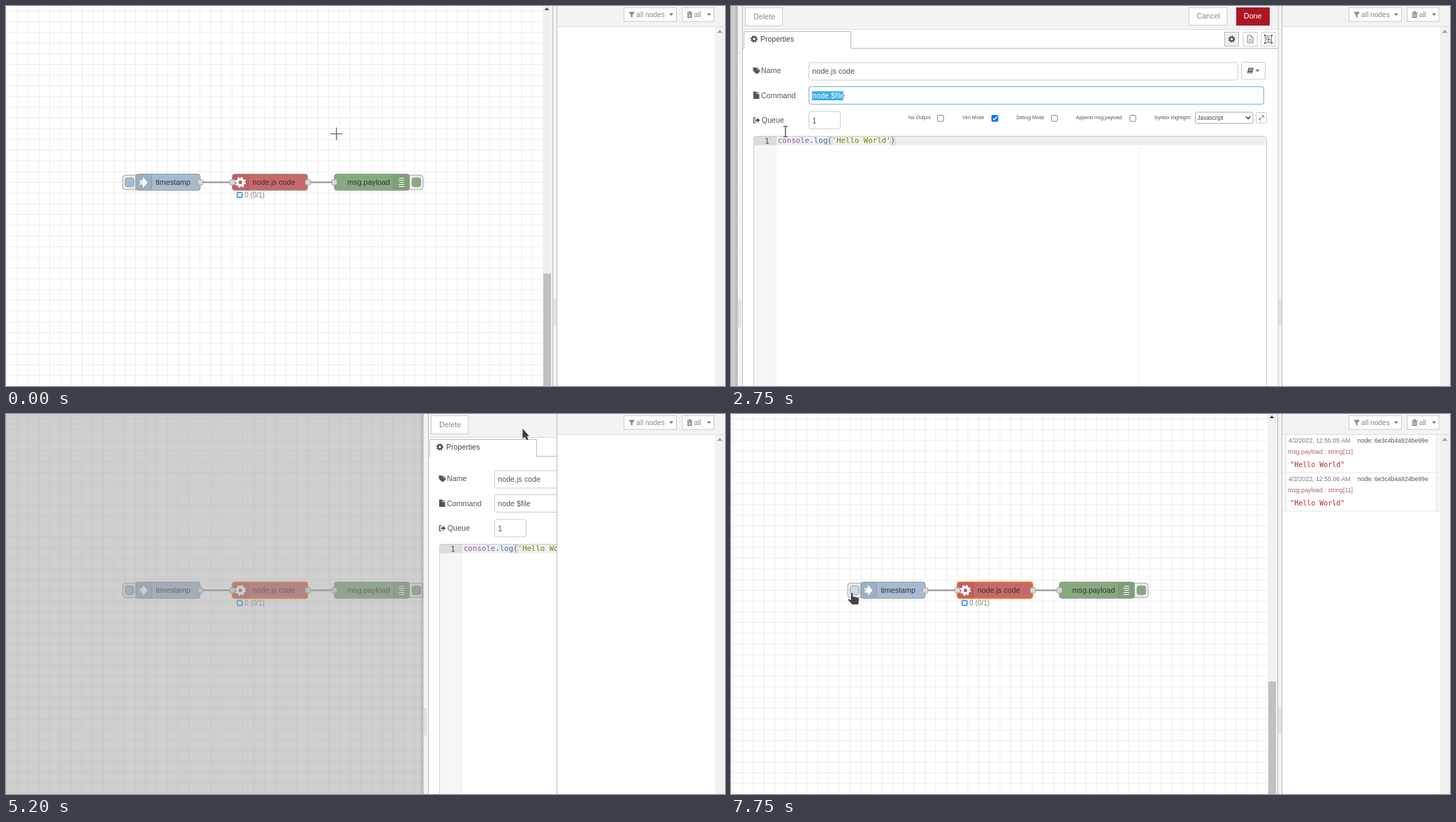
Animation, 1029 px wide and 544 px high, one loop 8 s. Source, as an HTML page:

```html
<!DOCTYPE html>
<html lang="en">
<head>
<meta charset="utf-8">
<title>Flow editor</title>
<style>
  html, body { margin: 0; width: 100%; height: 100%; overflow: hidden; background: #fff; }
  svg { display: block; width: 100vw; height: 100vh; }
  text { font: 10.745px "Liberation Sans", Arial, sans-serif; white-space: pre; }
  .mono { font-family: "DejaVu Sans Mono", monospace; }
</style>
</head>
<body>
<svg id="stage" viewBox="0 0 1029 544" xmlns="http://www.w3.org/2000/svg"></svg>
<script>
const LOOP = 8000, STEP = 50, TRAY_TRAVEL = 774, CLOSE_AT = 5108;
const GRID = 15.35;

// ---------- markup helpers ----------
const rect = (x, y, w, h, fill, stroke = 'none', r = 0, extra = '') =>
  `<rect x="${x}" y="${y}" width="${w}" height="${h}" rx="${r}" fill="${fill}" stroke="${stroke}" ${extra}/>`;
const line = (d, color = '#ccc', width = 1) =>
  `<path d="${d}" fill="none" stroke="${color}" stroke-width="${width}"/>`;
const shape = (d, fill, extra = '') => `<path d="${d}" fill="${fill}" ${extra}/>`;
const text = (x, y, s, fill = '#555', size = 10.745, extra = '') =>
  `<text x="${x}" y="${y}" fill="${fill}" style="font-size:${size}px" ${extra}>${s}</text>`;
const group = (id, body, extra = '') => `<g id="${id}" ${extra}>${body}</g>`;
const caret = (x, y, color = '#777') => shape(`M${x} ${y}h6l-3 3.4z`, color);
const gear = (x, y, r, color) => `<g fill="none" stroke="${color}">
  <circle cx="${x}" cy="${y}" r="${r * .57}" stroke-width="${r * .46}"/>
  <circle cx="${x}" cy="${y}" r="${r * .85}" stroke-width="${r * .34}" stroke-dasharray="${r * .334}"/></g>`;

// ---------- workspace ----------
function gridLines() {
  let d = '';
  for (let x = 1.3; x < 768; x += GRID) d += `M${x} 0V544`;
  for (let y = 6.9; y < 544; y += GRID) d += `M0 ${y}H768`;
  return line(d, '#eee');
}
const port = x => rect(x - 3.8, 248.6, 7.7, 7.7, '#d9d9d9', '#999', 2, 'stroke-width=".8"');
const nodeBody = (x, w, fill, id) =>
  rect(x, 240.5, w, 23.5, fill, '#999', 3.8, `stroke-width=".9" id="${id}"`);
const iconArea = (x, edge) =>
  rect(x, 241, 23, 22.6, 'rgba(0,0,0,.06)', 'none', 3) + line(`M${edge} 241V263.6`, 'rgba(0,0,0,.1)');
const sideButton = (x, innerX, fill, id) =>
  rect(x, 242.2, 26, 20.6, '#eee', '#999', 3.8, 'stroke-width=".9"') +
  rect(innerX, 246, 12.6, 12.8, fill, '#999', 3, `stroke-width=".9" id="${id}"`);

const workspace = gridLines() +
  line('M278 252.4H324M432 252.4H470', '#999', 2.3) +
  sideButton(167, 170.6, '#a6bbcf', 'injectButton') +
  nodeBody(185.6, 92.4, '#a6bbcf', 'injectNode') + iconArea(186, 208.6) +
  shape('M196 249v-4.5l6.5 8-6.5 8V256h-2.5v-7zM191.5 249h1.2v7h-1.2z', '#fff', 'opacity=".95"') +
  text(214.4, 256.3, 'timestamp', '#333') +
  nodeBody(323.8, 108, '#c7696b', 'codeNode') + iconArea(324.2, 346.8) +
  gear(335.5, 252.4, 7.6, '#fff') +
  text(352.8, 256.3, 'node.js code', '#333', 10.745, 'font-style="italic"') +
  sideButton(571, 581, '#87a980', 'debugButton') +
  nodeBody(469.8, 107.6, '#87a980', 'debugNode') + iconArea(554.5, 554.5) +
  text(488.6, 256.3, 'msg.payload', '#333') +
  line('M563 246.5h6.5M561.5 249.5h8.5M563 252.5h6.5M561.5 255.5h8.5M562 258.5h8', '#fff', 1.1) +
  [278, 324, 432, 470].map(port).join('') +
  rect(330.9, 266.9, 7, 7, '#fff', '#5a9fee', 1.5, 'stroke-width="2"') +
  text(341.3, 273.8, '0 (0/1)', '#888', 10, 'id="status"') +
  rect(768, 0, 14, 544, '#f1f1f1') + rect(769, 383, 11, 161, '#c1c1c1') +
  shape('M770.5 6h7l-3.5-4z', '#505050');

const separator = rect(782, 0, 7, 544, '#f3f3f3') + line('M782.5 0V544', '#bbb') +
  rect(784.6, 419.5, 2, 38, '#fff', '#bbb', 1, 'stroke-width=".8"');

// ---------- sidebar ----------
const message = (id, y, time) => group(id,
  rect(790, y, 5, 54.6, '#f5f5f5') + rect(1009, y, 5.5, 54.6, '#f5f5f5') +
  line(`M794.5 ${y}v54M1009.5 ${y}v54M790 ${y + 54}H1014.5`, '#e4e4e4') +
  text(797.8, y + 11.4, `4/2/2022, ${time} AM`, '#777', 8.8) +
  text(896.8, y + 11.4, 'node: 6e3c4b4a924be99e', '#555', 8.7) +
  text(796.8, y + 27, 'msg.payload : string[11]', '#aa6767', 8.85) +
  text(800.2, y + 46, '"Hello World"', '#b72828', 9.98, 'class="mono"'));

const sidebar = rect(789, 0, 240, 544, '#fff') + rect(789, 0, 240, 29, '#f3f3f3') +
  line('M789 29.5H1029', '#ddd') + rect(1014.5, 30, 14.5, 514, '#f1f1f1') +
  shape('M1017.5 38.5h8l-4-4.5z', '#a3a3a3') +
  rect(884.5, 2.5, 75, 19.5, '#fff', '#ccc') + rect(968, 2.5, 45, 19.5, '#fff', '#ccc') +
  shape('M891 8.5h9l-3.4 4.2v4.3l-2.2-1.6v-2.7z', '#888') +
  text(902, 16, 'all nodes', '#888', 10.2) + caret(949, 10.6) +
  shape('M974.5 9h2l.8-1.5h2.4l.8 1.5h2v1.2h-8zM975.2 10.8h6.6v6.2h-6.6z', '#888') +
  line('M977 12v4M978.5 12v4M980 12v4', '#fff', .6) +
  text(984.8, 16, 'all', '#888', 10.2) + caret(1003, 10.6) +
  message('message1', 30, '12:55:05') + message('message2', 85, '12:55:06') +
  line('M788.5 0V544', '#bbb');

// ---------- editor tray ----------
const field = (x, y, w) => rect(x, y, w, 25, '#fff', '#ccc', 3);
const checkbox = (x, label, labelX) => text(labelX, 162.4, label, '#555', 7) +
  rect(x, 156.5, 8.6, 8.6, '#fff', '#767676', 1.5, 'stroke-width=".9"');
const span = (fill, s) => `<tspan fill="${fill}">${s}</tspan>`;
const CHAR = 6.468;
const bracketBox = i => rect(67 + i * CHAR, 187.5, CHAR, 11.5, 'none', '#c4c4c4', 1, 'stroke-width=".8"');

const tray =
  rect(4, 0, 6, 544, 'url(#shadow)') + rect(9.5, 0, 7, 544, '#f3f3f3') +
  rect(11.3, 421.5, 2, 38, '#fff', '#bbb', 1, 'stroke-width=".8"') +
  rect(16, 0, 767, 544, '#fff') + rect(16, 0, 767, 33, '#f3f3f3') +
  line('M9.5 0V544M783 0V544', '#ccc') + line('M16.5 0V544', '#bbb') + line('M17 33.5H783', '#ddd') +
  rect(20.5, 2.5, 53, 26, '#fff', '#ccc') + text(32.2, 19, 'Delete', '#888') +
  rect(655.5, 2.5, 54.5, 25, '#fff', '#ccc') + text(666.4, 18.4, 'Cancel', '#888') +
  rect(723, 2, 48, 26, '#ad1625', 'none', 0, 'id="done"') + text(733.7, 18.4, 'Done', '#fff') +
  line('M17 60.5H18.5V36.5H171.5V60.5H783', '#bbb') +
  gear(33, 47.2, 5, '#555') + text(42, 51, 'Properties', '#444', 10.6, 'font-weight="bold"') +
  rect(706.5, 37.5, 20, 20, '#eee', '#bbb') + rect(733, 37.5, 20, 20, '#fff', '#ccc') +
  rect(759, 37.5, 20, 20, '#fff', '#ccc') + gear(716.6, 47.4, 4.8, '#555') +
  line('M739.3 42h5l2.8 2.8v8h-7.8zM744 42v3h3M741 48h4.5M741 50.3h4.5', '#777', .9) +
  line('M764.5 43h9v9.500h-9zM766.500 45h3.500v3.500h-3.500zM768.500 47.500h3.500v3.500h-3.500z', '#777', .9) +
  line('M763 42h2M763 53h2M773 42h2M773 53h2', '#555', 1.8) +
  shape('M31.500 88h4l5 5-4 4.500-5-5zM38 88l4 4.800-3.600 4.500-.7-.6 3-3.900-4-4.800z', '#555') +
  text(43, 96.3, 'Name') +
  shape('M32 122.500h4.500v3.500h4v7h-8.500zM37.300 122.500l3.200 2.800h-3.200z', '#555') +
  text(43, 131.7, 'Command') +
  line('M35.500 159.800h-3v7.400h3', '#555', 1.3) +
  shape('M34.500 162.200h3v-2.400l4 3.700-4 3.700v-2.400h-3z', '#555') +
  text(43.800, 167, 'Queue') +
  field(111.5, 81, 614) + text(116.2, 97.2, 'node.js code') +
  rect(730.5, 80.5, 34, 24.5, '#fff', '#ccc', 2) +
  shape('M740.500 88.500h7.500l-2 8h-7.500z', '#666') +
  line('M741.500 90.500h4.500M741 92.500h4.500M739.500 95.500h6', '#fff', .6) + caret(750.500, 91) +
  field(111.5, 115.5, 651) + text(116.2, 132.2, 'node $file') +
  rect(111.5, 115.5, 651, 25, 'none', '#7cade0', 3, 'id="focus"') +
  `<g clip-path="url(#selectionClip)">${rect(100, 122, 80, 13.3, '#3daee9')}${text(116.2, 132.2, 'node $file', '#fff')}</g>` +
  field(111.5, 151, 45) + text(116.2, 167.5, '1') +
  checkbox(295.6, 'No Output', 253.8) + checkbox(373.2, 'Vim Mode', 331) +
  rect(372.9, 156.1, 9.4, 9.4, '#0075ff', 'none', 1.5) + line('M374.800 161l2 2 3.700-4.700', '#fff', 1.4) +
  checkbox(458.6, 'Debug Mode', 408.4) + checkbox(570.8, 'Append msg.payload', 493.8) +
  text(606, 162.4, 'Syntax Highlight:', '#555', 7) +
  rect(664.5, 152, 82.5, 16, '#fff', '#aaa', 2) + text(667.5, 163, 'Javascript', '#444', 8.2) +
  line('M737 158.300l3.200 3.200 3.200-3.200', '#333', 1.500) +
  rect(751.5, 152.5, 15, 15, '#fff', '#ccc', 2) +
  line('M756 163l6.500-6M759.500 157h3v3M756 160v3h3', '#777', .9) +
  rect(32.5, 186.5, 734, 370, '#fff', '#ccc', 3) + rect(33, 187, 32, 357, '#f6f6f6') +
  rect(33, 187, 32, 12.4, '#dcdcdc') + rect(65, 187, 701, 12.4, '#efefef') +
  line('M584.5 187V544', '#f2f2f2') +
  text(48.3, 197, '1', '#4d4d4c', 10.745, 'class="mono"') +
  bracketBox(11) + bracketBox(25) +
  text(67, 196.4, span('#8959a8', 'console') + span('#4d4d4c', '.') + span('#4271ae', 'log') +
    span('#4d4d4c', '(') + span('#718c00', "'Hello World'") + span('#4d4d4c', ')'),
    '#4d4d4c', 10.745, 'class="mono"');

// ---------- pointers, each with its hot spot at 0,0 ----------
const outline = 'stroke="#fff" stroke-width=".7" stroke-linejoin="round"';
const beam = 'M-3-7.500h2l1 .7 1-.7h2M0-7V7M-3 7.500h2l1-.7 1 .7h2';
const pointers = {
  cross: line('M-9 0H9M0-9V9', '#fff', 2) + line('M-9 0H9M0-9V9', '#444', 1.1),
  arrow: shape('M0 0V16L3.600 13.200 5.800 18 9 16.500 7 12H10.500Z', '#3c3c3c', outline),
  beam: line(beam, '#fff', 2.6) + line(beam, '#222', 1.1),
  hand: shape('M-1.700.5q1.700-2 3.400 0V5l6 1.200q2.800.8 2.700 3.500L9.500 17H.5L-5.800 10.200q.2-2 2-1.400L-1.700 10Z', '#444', outline)
};

const stage = document.getElementById('stage');
stage.innerHTML = `<defs>
  <linearGradient id="shadow"><stop stop-color="#000" stop-opacity="0"/><stop offset="1" stop-color="#000" stop-opacity=".14"/></linearGradient>
  <clipPath id="selectionClip"><rect id="selection" y="122" height="13.3"/></clipPath>
  <clipPath id="trayClip"><rect width="788.5" height="544"/></clipPath></defs>` +
  workspace + separator + group('shade', rect(0, 0, 782, 544, 'rgba(160,160,160,.5)')) +
  `<g clip-path="url(#trayClip)">${group('tray', tray)}</g>` + sidebar +
  group('pointer', Object.entries(pointers).map(([name, body]) => group(name, body)).join(''));

// ---------- motion ----------
const $ = id => document.getElementById(id);
const show = (id, on) => $(id).setAttribute('visibility', on ? 'visible' : 'hidden');
const between = (t, a, b) => t >= a && t < b;
const ramp = (t, a, b) => Math.min(1, Math.max(0, (t - a) / (b - a)));

// CSS "ease" timing curve
function ease(p) {
  let lo = 0, hi = 1;
  const bezier = (s, a, b) => 3 * (1 - s) ** 2 * s * a + 3 * (1 - s) * s * s * b + s ** 3;
  for (let i = 0; i < 20; i++) {
    const mid = (lo + hi) / 2;
    if (bezier(mid, .25, .25) < p) lo = mid; else hi = mid;
  }
  return bezier(lo, .1, 1);
}

// time, x, y
const path = [
  [0, 473, 183], [150, 470, 164], [300, 400, 190], [420, 334, 255], [530, 345, 331],
  [650, 362, 275], [750, 364, 256], [1449, 364, 256],
  [1450, 335, 241], [1500, 335, 241], [1900, 165, 128], [2350, 165, 128], [2600, 108, 146],
  [2800, 68, 191], [3350, 68, 191], [3550, 80, 290], [3650, 150, 311], [4050, 646, 179],
  [4200, 692, 115], [4500, 739, 20], [5600, 739, 20], [5850, 610, 105], [6200, 230, 230],
  [6350, 169, 259], [6400, 174, 257], [6450, 174, 257], [6500, 173, 256], [LOOP, 173, 256]
];
function pointerAt(t) {
  const i = path.findIndex(key => key[0] > t);
  const [t0, x0, y0] = path[i - 1], [t1, x1, y1] = path[i];
  const p = ramp(t, t0, t1);
  return [x0 + (x1 - x0) * p, y0 + (y1 - y0) * p];
}
function pointerKind(t, x, y) {
  const inside = (l, top, r, b) => x >= l && x <= r && y >= top && y <= b;
  if (t < 1250) return inside(323, 240, 432, 264) ? 'arrow' : 'cross';
  if (t < 1450) return 'arrow';
  if (t < 5100) return inside(723, 2, 771, 28) ? 'hand' : between(t, 4250, 5100) ? 'arrow' : 'beam';
  if (t < 5500) return 'arrow';
  return inside(167, 242, 185, 263) ? 'hand' : 'cross';
}

function draw(t) {
  const [x, y] = pointerAt(t), kind = pointerKind(t, x, y);
  $('pointer').setAttribute('transform', `translate(${x} ${y})`);
  for (const name in pointers) show(name, name === kind);

  const selected = t >= 950;
  $('codeNode').setAttribute('stroke', selected ? '#ff7f0e' : '#999');
  $('codeNode').setAttribute('stroke-width', selected ? 1.6 : .9);

  const editing = between(t, 1250, 5500);
  show('shade', editing);
  show('tray', editing);
  const offset = t < 1450 ? TRAY_TRAVEL : ease(ramp(t, CLOSE_AT, CLOSE_AT + 200)) * TRAY_TRAVEL;
  $('tray').setAttribute('transform', `translate(${offset} 0)`);

  $('focus').setAttribute('opacity', ramp(t, 2350, 2600) - ramp(t, 4600, 4850));
  const from = Math.max(115.8, Math.min(160.6, x));
  const start = t < 2800 ? from : 115.8;
  $('selection').setAttribute('x', start);
  $('selection').setAttribute('width', between(t, 2400, 4650) ? 160.6 - start : 0);
  $('done').setAttribute('fill', between(t, 4250, 5500) && kind !== 'beam' && x > 723 ? '#6e0a1e' : '#ad1625');

  const pressed = between(t, 6850, 7000) || between(t, 7500, 7650);
  const hovered = t >= 5500 && kind === 'hand';
  $('injectButton').setAttribute('fill-opacity', pressed ? .2 : hovered ? .4 : 1);
  const running = between(t, 7000, 7100) || between(t, 7650, 7750);
  $('status').textContent = running ? '0 (1/1)' : '0 (0/1)';
  show('message1', t >= 7050);
  show('message2', t >= 7700);
}

const began = performance.now();
function tick() {
  const t = (performance.now() - began) % LOOP;
  draw(Math.floor(t / STEP) * STEP);
  requestAnimationFrame(tick);
}
tick();
</script>
</body>
</html>
```
